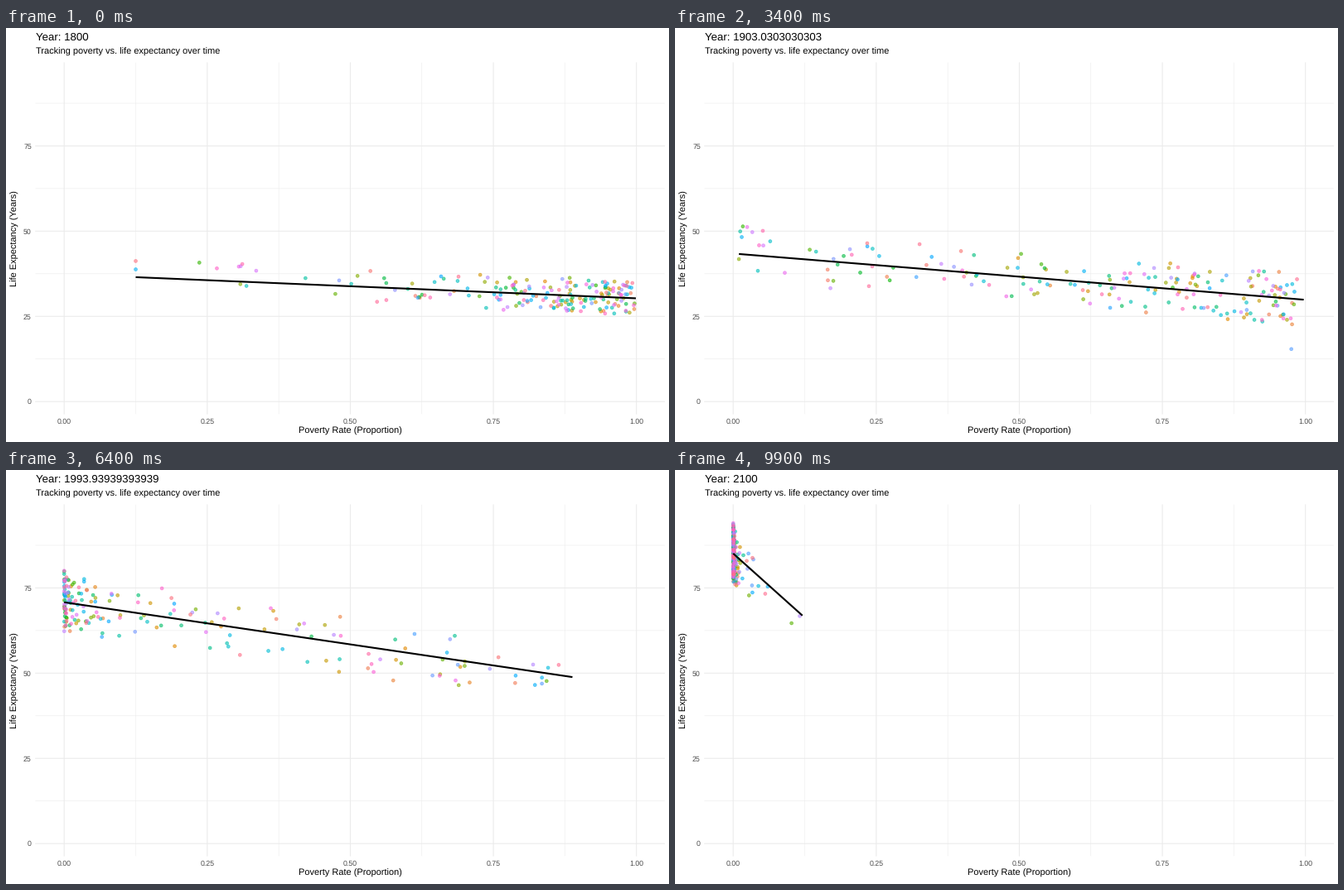
Write a matplotlib script that moves like this. It is 800x500 px and loops after 10 s.

```python
import numpy as np
import matplotlib.pyplot as plt
from matplotlib.animation import FuncAnimation

plt.rcParams["font.family"] = "Liberation Sans"
plt.rcParams["text.hinting"] = "none"

W, H, DPI = 800, 500, 72
FRAMES, STEP_MS = 100, 100
N = 195

# Key points of the overall trend, joined by straight lines.
KEYS = [0, 22, 34, 46, 55, 74, 99]
TREND = {
    # ends of the fitted line
    "x0": [.125, .07, .010, .002, 0, 0, 0],
    "y0": [36.5, 36.7, 43.3, 53.3, 66.2, 75.9, 85.1],
    "x1": [.999, .998, .997, .994, .972, .795, .121],
    "y1": [30.3, 30.2, 29.9, 31.7, 42.5, 55.9, 66.9],
    # spread of poverty on the logit scale
    "level": [2, 1.45, .9, .04, -1.66, -4.4, -7.4],
    "width": [1.35, 1.45, 1.65, 2, 2.7, 3.1, 1.9],
    "skew": [.03, .08, .12, .15, .2, .13, 0],
    # scatter of life expectancy around the line
    "scatter": [2.9, 3.3, 4.5, 6.2, 5, 5, 5],
}


def trend(name, t):
    return np.interp(t, KEYS, TREND[name])


def hcl(hue, chroma=100, light=65):
    """Polar LUV colour as sRGB."""
    a = np.radians(hue)
    lum = ((light + 16) / 116) ** 3
    u = chroma * np.cos(a) / (13 * light) + .1978
    v = chroma * np.sin(a) / (13 * light) + .4683
    x = 9 * lum * u / (4 * v)
    z = lum * (12 - 3 * u - 20 * v) / (4 * v)
    rgb = np.array([3.2405 * x - 1.5371 * lum - .4985 * z,
                    -.9693 * x + 1.8760 * lum + .0416 * z,
                    .0556 * x - .2040 * lum + 1.0572 * z])
    rgb = np.clip(rgb, 0, 1)
    return np.where(rgb > .0031308, 1.055 * rgb ** (1 / 2.4) - .055, 12.92 * rgb)


def drift(rng, t, turn):
    """Normal scores that slowly change order, shape (len(t), N)."""
    a, b = rng.normal(size=(2, N))
    angle = turn * t / FRAMES
    return a * np.cos(angle) + b * np.sin(angle)


def build_paths():
    """Poverty and life expectancy, each of shape (FRAMES, N)."""
    rng = np.random.default_rng(18)
    t = np.arange(FRAMES)[:, None]
    p = {name: trend(name, t) for name in TREND}

    poor = drift(rng, t, 1.3)
    logit = p["level"] + p["width"] * (poor - p["skew"] * (poor ** 2 - 1))
    x = np.clip(1 / (1 + np.exp(-logit)), p["x0"], p["x1"])

    # The richest live longer than the line alone suggests.
    health = drift(rng, t, 1.8) + 1.2 * np.clip(-1 - poor, 0, 1)
    slope = (p["y1"] - p["y0"]) / (p["x1"] - p["x0"])
    y = p["y0"] + slope * (x - p["x0"])
    y += p["scatter"] * 1.9 * np.tanh(health / 1.6)

    # Brief crises, milder in later years.
    for centre in range(8, 72, 9):
        i = rng.integers(N)
        low = rng.uniform(1, 9) + 1.5 * max(0, centre - 55)
        dip = np.clip(1 - abs(t[:, 0] - centre) / 2, 0, 1)
        y[:, i] += (low - y[:, i]) * dip
    return x, y


def px(x):
    return 70.2 + 690.5 * np.asarray(x)


def py(y):
    return 451.2 - 4.117 * np.asarray(y)


fig = plt.figure(figsize=(W / DPI, H / DPI), dpi=DPI, facecolor="white")
ax = fig.add_axes([0, 0, 1, 1])
ax.set(xlim=(0, W), ylim=(H, 0))
ax.axis("off")

LEFT, RIGHT, TOP, BOTTOM = 35.7, 794.5, 42, 466
X_TICKS, Y_TICKS = np.arange(0, 1.1, .25), np.arange(0, 80, 25)
GRID, TICK = "#EBEBEB", "#4D4D4D"


def grid(xs, ys, width):
    style = dict(color=GRID, lw=width, snap=False, zorder=1)
    for x in px(xs):
        ax.plot([x, x], [TOP, BOTTOM], **style)
    for y in py(ys):
        ax.plot([LEFT, RIGHT], [y, y], **style)


def label(x, y, text, size=11, **kw):
    return ax.text(x, y, text, size=size, va="baseline", **kw)


grid(X_TICKS[:-1] + .125, Y_TICKS + 12.5, .53)
grid(X_TICKS, Y_TICKS, 1.07)
for v in X_TICKS:
    label(px(v), 478.2, f"{v:.2f}", 8.8, color=TICK, ha="center")
for v in Y_TICKS:
    label(30.8, py(v) + 3.2, str(v), 8.8, color=TICK, ha="right")

label(415, 490, "Poverty Rate (Proportion)", ha="center")
label(13.5, 254, "Life Expectancy (Years)", rotation=90,
      rotation_mode="anchor", ha="center")
title = label(LEFT, 15, "", 13.2)
label(LEFT, 32, "Tracking poverty vs. life expectancy over time")

poverty, life = build_paths()
colors = [hcl(15 + 360 * i / N) for i in range(N)]
dots = ax.scatter(np.zeros(N), np.zeros(N), s=3.9 ** 2, c=colors,
                  edgecolors=colors, linewidths=.71, alpha=.6, zorder=2)
fit, = ax.plot([], [], color="black", lw=2.13, solid_capstyle="butt", zorder=3)


def update(i):
    title.set_text(f"Year: {1800 + 300 * i / (FRAMES - 1):.15g}")
    dots.set_offsets(np.column_stack([px(poverty[i]), py(life[i])]))
    fit.set_data(px([trend("x0", i), trend("x1", i)]),
                 py([trend("y0", i), trend("y1", i)]))
    return title, dots, fit


anim = FuncAnimation(fig, update, frames=FRAMES, interval=STEP_MS,
                     repeat=True, repeat_delay=0)
plt.show()
```
